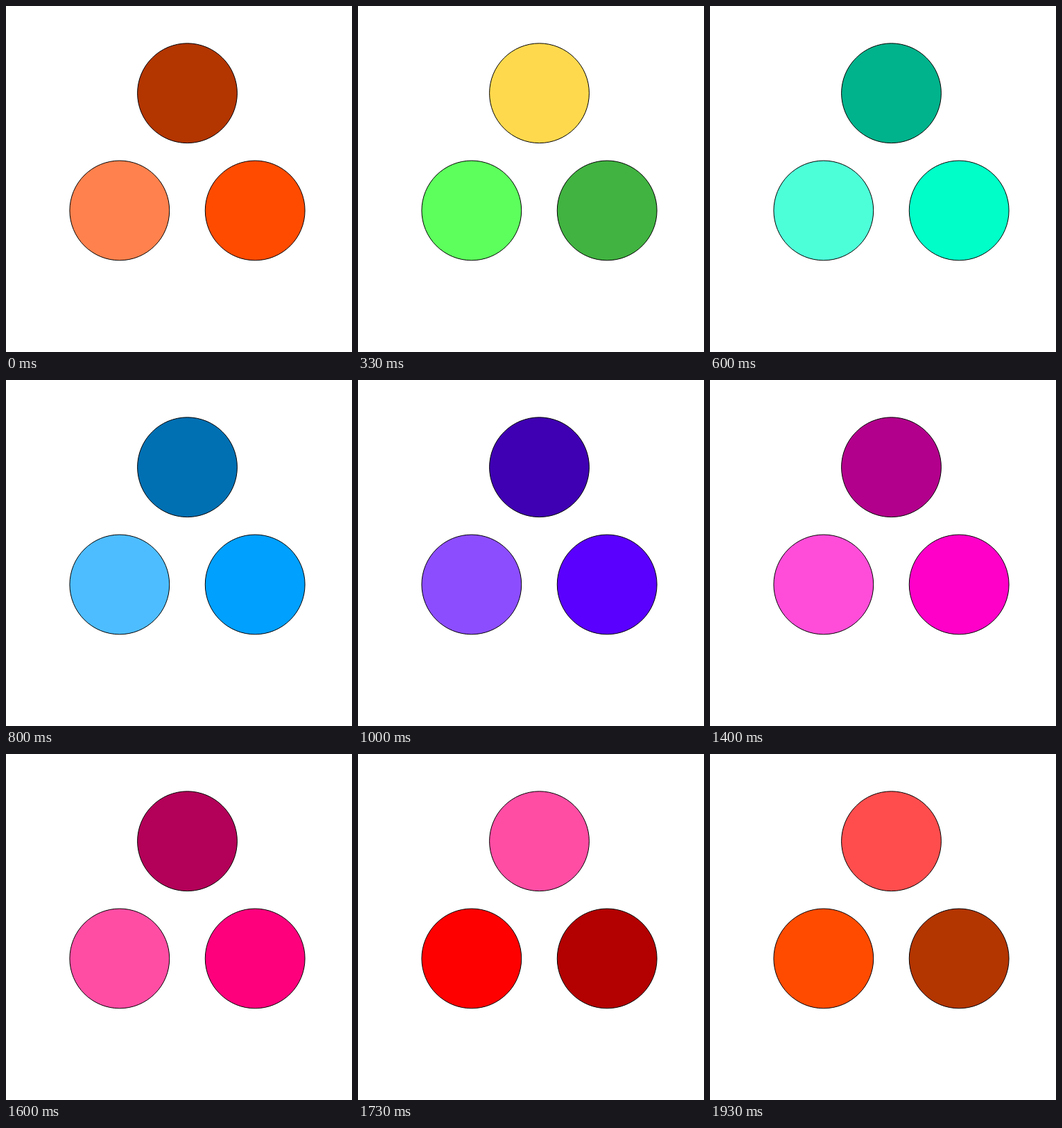
Recreate the animation shown at these times as an HTML page. Size 499 by 499 pixels, loop 1.99 s.

```html
<!DOCTYPE html>
<html lang="en">
<head>
<meta charset="utf-8">
<title>Colour cycle</title>
<style>
  html, body { margin: 0; width: 100%; height: 100%; overflow: hidden; background: #fff; }
  svg { display: block; width: 100%; height: 100%; }
  circle { stroke: #000; stroke-width: 1; }
</style>
</head>
<body>
<svg viewBox="0 0 499 499"></svg>
<script>
  const LOOP = 1990;
  const FRAME_RATE = 15;
  const CENTER = { x: 261.5, y: 238.55 };
  const SPREAD = 112.8;
  const RADIUS = 71.9;

  const hues = "#ff4b00 #ffc800 #5cff5c #00ffc8 #00a0ff #5a00ff #af00ff #ff00c8 #ff007d #f00".split(" ");
  const mix = (color, other) => `color-mix(in srgb, ${color} 70%, ${other})`;

  // Each hue runs through dark, plain and light.
  const palette = hues.flatMap(hue => [mix(hue, "black"), hue, mix(hue, "white")]);

  // Corners of an equilateral triangle: left, right, top.
  function addCircle(index) {
    const angle = (150 - 120 * index) * Math.PI / 180;
    const circle = document.createElementNS("http://www.w3.org/2000/svg", "circle");
    circle.setAttribute("cx", CENTER.x + SPREAD * Math.cos(angle));
    circle.setAttribute("cy", CENTER.y + SPREAD * Math.sin(angle));
    circle.setAttribute("r", RADIUS);
    document.querySelector("svg").append(circle);
    return circle;
  }

  const circles = [0, 1, 2].map(addCircle);

  // Steps begin on the nearest 10 ms, so look 5 ms past the current 10 ms slot.
  function stepAt(time) {
    const slot = Math.floor((time % LOOP) / 10) * 10;
    return Math.floor((slot + 5) * FRAME_RATE / 1000);
  }

  // Colours enter at the left, then pass to the right and the top.
  function draw(time) {
    const step = stepAt(time);
    circles.forEach((circle, i) => {
      circle.style.fill = palette[(step + 2 - i) % palette.length];
    });
  }

  const start = performance.now();
  function tick() {
    draw(performance.now() - start);
    requestAnimationFrame(tick);
  }
  tick();
</script>
</body>
</html>
```
